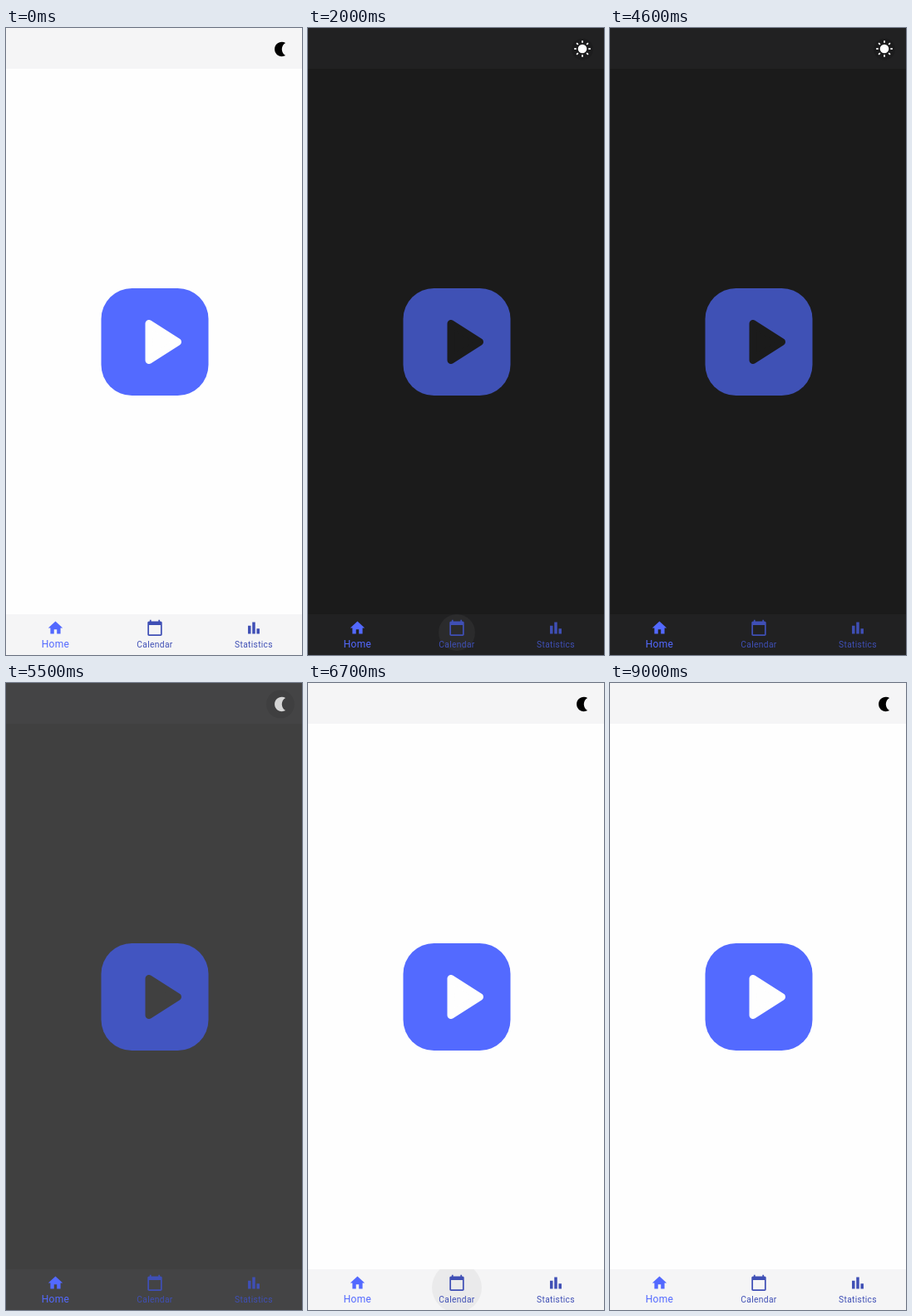
An HTML page that plays this animation: 356 by 754 pixels, repeating every 9200 ms.

```html
<!DOCTYPE html>
<html lang="en">
<head>
<meta charset="utf-8">
<title>Sleep tracker</title>
<style>
  html, body { margin: 0; width: 100%; height: 100%; overflow: hidden; background: #fff; }
  svg { display: block; width: 356px; height: 754px; background: var(--bg); font-family: Roboto, sans-serif; }
  .bar { fill: var(--bar); }
  .ink { fill: var(--ink); }
  .accent { fill: #5369ff; }
  .primary { fill: var(--primary); }
  .hole { fill: var(--bg); stroke: var(--bg); stroke-width: 9; stroke-linejoin: round; }
  .mid { text-anchor: middle; }
  .title { font-size: 35px; font-weight: 700; }
  .day { font-size: 14px; font-weight: 700; }
  .weekday { fill: var(--weekday); }
  .outside { fill: #777; }
  .picked { fill: var(--bg); }
  .head { font-size: 27.3px; font-weight: 700; }
  .body { font-size: 16.6px; font-weight: 500; letter-spacing: .52px; }
  .label { letter-spacing: .3px; }
  .frame { fill: none; stroke: #5048ff; stroke-opacity: .22; stroke-width: 3; }
</style>
</head>
<body>
<svg viewBox="0 0 356 754">
  <g id="home">
    <rect class="bar" width="356" height="49"/>
    <circle id="iconRipple" cx="330" cy="25.5"/>
    <path id="moon" class="ink" transform="translate(319.6 15) scale(.87)"
      d="M14 2c1.82 0 3.53.5 5 1.35-2.99 1.73-5 4.95-5 8.65s2.01 6.92 5 8.65C17.53 21.5 15.82 22 14 22 8.48 22 4 17.52 4 12S8.48 2 14 2z"/>
    <g id="sun" class="ink" transform="translate(330 25)"><circle r="5.3"/></g>
    <rect class="primary" x="114.5" y="313" width="129" height="129" rx="37"/>
    <path class="hole" d="M172 355.5V399.5L206.500 377.500Z"/>
  </g>
  <g id="calendar">
    <text class="mid title ink" x="179" y="47">July 2024</text>
    <path class="ink" transform="translate(38.500 24.800) scale(.85)" d="M15.410 7.410L14 6l-6 6 6 6 1.410-1.410L10.830 12z"/>
    <path class="ink" transform="translate(318.500 24.800) scale(-.85 .85)" d="M15.410 7.410L14 6l-6 6 6 6 1.410-1.410L10.830 12z"/>
    <g id="days"></g>
    <g id="card">
      <rect class="frame" x="30" y="340.500" width="298" height="358.500" rx="8"/>
      <path class="frame" d="M43 433.500H315"/>
      <g id="session" class="accent"></g>
    </g>
  </g>
  <rect class="bar" y="705" width="356" height="49"/>
  <clipPath id="navClip"><rect y="705" width="356" height="49"/></clipPath>
  <circle id="navRipple" cy="727" clip-path="url(#navClip)"/>
  <g id="nav"></g>
</svg>
<script>
const $ = id => document.getElementById(id);
const clamp = v => Math.max(0, Math.min(1, v));
const mix = (a, b, k) => `rgb(${a.map((v, i) => Math.round(v + (b[i] - v) * k))})`;

function add(parent, tag, attrs, text = '') {
  const el = document.createElementNS('http://www.w3.org/2000/svg', tag);
  for (const key in attrs) el.setAttribute(key, attrs[key]);
  el.textContent = text;
  parent.append(el);
  return el;
}

// Sun rays
for (let a = 0; a < 360; a += 45)
  add($('sun'), 'path', { d: 'M7.3-.9h2.500v1.800h-2.500z', transform: `rotate(${a})` });

// Month grid, starting on Sunday 30 June
const colX = c => 43.5 + 45.1 * c;
['Sun', 'Mon', 'Tue', 'Wed', 'Thu', 'Fri', 'Sat'].forEach((name, c) =>
  add($('days'), 'text', { x: colX(c), y: 81, class: 'mid day weekday' }, name));
const days = {};
for (let i = 0; i < 35; i++) {
  const c = i % 7, x = colX(c), y = 103 + 45.25 * Math.floor(i / 7);
  const inMonth = i > 0 && i < 32;
  const tone = !inMonth ? 'outside' : c % 6 ? 'ink' : 'accent';
  const disc = add($('days'), 'circle', { cx: x, cy: y, r: 17.3, class: 'primary', opacity: 0 });
  const text = add($('days'), 'text', { x, y: y + 5, class: `mid day ${tone}` }, i === 0 ? 30 : inMonth ? i : i - 31);
  if (inMonth) days[i] = { disc, text, tone };
}
function markDay(n, opacity) {
  const { disc, text, tone } = days[n];
  disc.setAttribute('opacity', opacity);
  text.setAttribute('class', `mid day ${opacity ? 'picked' : tone}`);
}

// Session card
['Sleep Session', '21.07.2024'].forEach((line, i) =>
  add($('session'), 'text', { x: 43, y: 379 + 38 * i, class: 'head' }, line));
['Start time: 00:21', 'End Time: 08:16', 'Quality rating: 3/5',
 "Comments: couldn't fall asleep for", 'an extra half an hour...'].forEach((line, i) =>
  add($('session'), 'text', { x: 43, y: 463 + 24.3 * i, class: 'body' }, line));

// Bottom navigation
const tabs = [
  ['Home', 59.5, 'M10 20v-6h4v6h5v-8h3L12 3 2 12h3v8z'],
  ['Calendar', 179, 'M20 3h-1V1h-2v2H7V1H5v2H4c-1.100 0-2 .9-2 2v16c0 1.100.9 2 2 2h16c1.100 0 2-.9 2-2V5c0-1.100-.9-2-2-2zm0 18H4V8h16v13z'],
  ['Statistics', 298, 'M4 9h4v11H4zm12 4h4v7h-4zm-6-9h4v16h-4z']
].map(([name, x, d]) => {
  const g = add($('nav'), 'g', {});
  add(g, 'path', { d, transform: `translate(${x - 10.45} 711) scale(.87)` });
  return { g, label: add(g, 'text', { x, y: 745.3, class: 'mid label' }, name) };
});

const LOOP = 9200, STEP = 100;
const toDark = 748, toLight = 5467, themeTime = 200;
// Calendar visits: [opened, day picked, closed]
const visits = [[2300, 3000, 4450], [6900, 7800, 8650]];
const navTaps = [[179, 2000, 2300], [179, 6600, 6900]];
const iconTaps = [[700, 1000], [5400, 5700]];
const show = (id, on) => $(id).style.display = on ? '' : 'none';

function draw(t) {
  const dark = clamp((t - toDark) / themeTime) - clamp((t - toLight) / themeTime);
  const isDark = t > toDark && t < toLight;
  const vars = {
    bg: mix([254, 254, 254], [27, 27, 27], dark),
    bar: mix([245, 245, 246], [33, 33, 34], dark),
    ink: mix([0, 0, 0], [255, 255, 255], dark),
    primary: mix([83, 106, 255], [63, 81, 181], dark),
    weekday: mix([79, 79, 79], [29, 29, 29], dark)
  };
  for (const key in vars) document.documentElement.style.setProperty('--' + key, vars[key]);

  const visit = visits.find(([open, , close]) => t >= open && t < close);
  const picked = visit && t >= visit[1];
  show('home', !visit);
  show('calendar', visit);
  show('card', picked);
  show('moon', !isDark);
  show('sun', isDark);
  markDay(1, picked ? .78 : 1);
  markDay(21, picked ? 1 : 0);

  // Selected tab grows as the old one shrinks
  let cal = 0;
  for (const [open, , close] of visits)
    cal += clamp((t - open + 50) / 150) - clamp((t - close) / 150);
  [1 - cal, cal, 0].forEach((k, i) => {
    tabs[i].g.setAttribute('fill', mix([63, 79, 181], [83, 105, 255], k));
    tabs[i].label.setAttribute('font-size', 10.3 + 1.7 * k);
  });

  const iconTap = iconTaps.find(([a, b]) => t >= a && t <= b);
  $('iconRipple').setAttribute('r', iconTap ? 17 : isDark ? 13 : 0);
  $('iconRipple').setAttribute('opacity', iconTap ? .07 : .14);

  const tap = navTaps.find(([, a, b]) => t >= a && t < b);
  $('navRipple').setAttribute('cx', tap ? tap[0] : 0);
  $('navRipple').setAttribute('r', !tap ? 0 : isDark ? 22 : 20 + 10 * clamp((t - tap[1]) / 100));
  $('navRipple').setAttribute('fill', isDark ? '#fff' : '#000');
  $('navRipple').setAttribute('opacity', .045);
}

function tick() {
  draw(Math.floor(performance.now() % LOOP / STEP) * STEP);
  requestAnimationFrame(tick);
}
tick();
</script>
</body>
</html>
```
